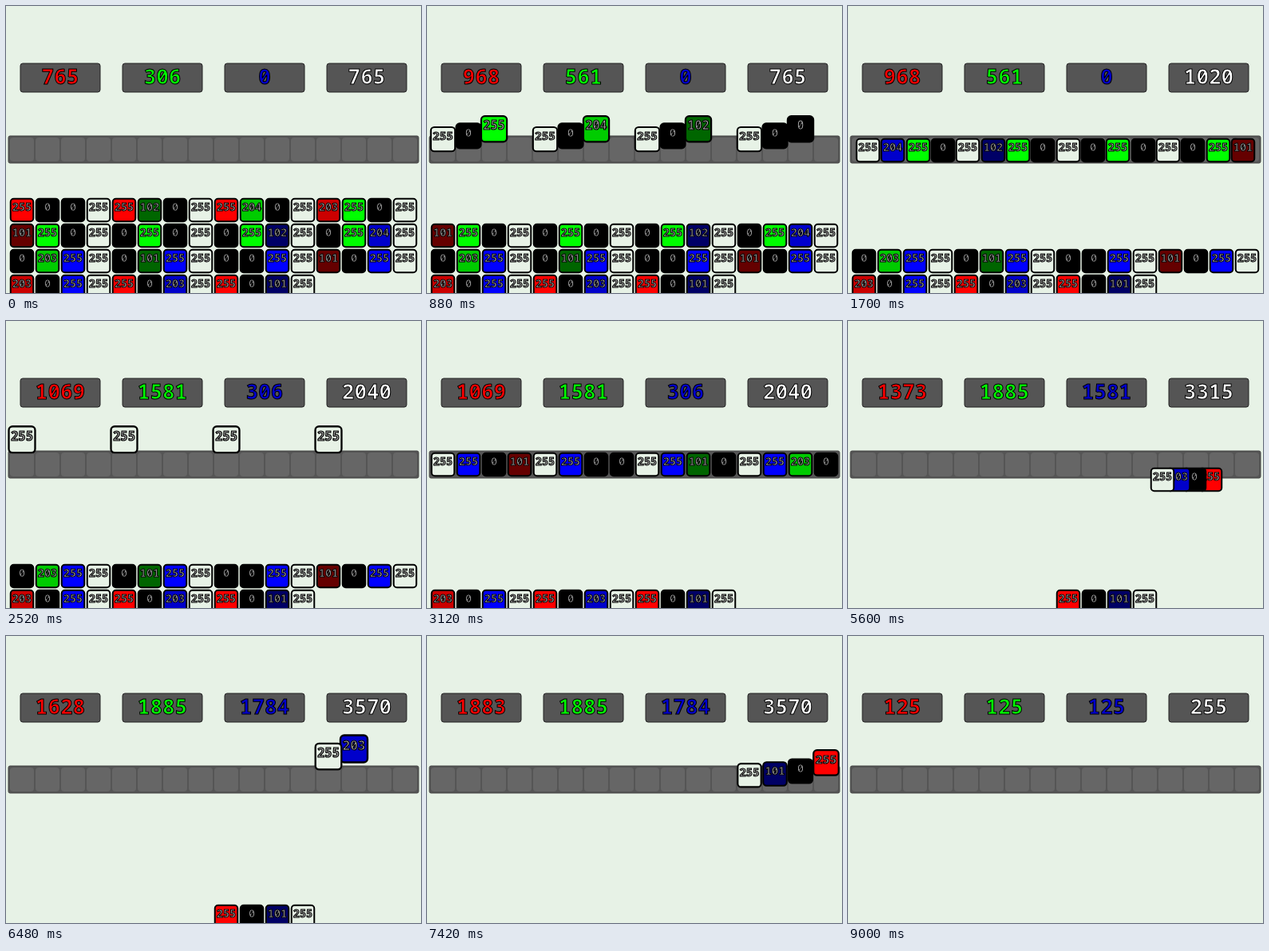
An HTML page with a canvas for the animation above (10 s loop, 520 by 360 pixels).

```html
<!DOCTYPE html>
<html lang="en">
<head>
<meta charset="utf-8">
<title>Average colour, four pixels at a time</title>
<style>
  html, body { margin: 0; width: 100%; height: 100%; overflow: hidden; background: #e7f2e6; }
  canvas { display: block; width: 520px; height: 360px; }
</style>
</head>
<body>
<canvas id="stage" width="520" height="360"></canvas>
<script>
const ctx = document.getElementById('stage').getContext('2d');
const LOOP = 10000, CYCLE = 4000 / 3, HALF = CYCLE / 2, BEAT = 250 / 3;
const PAPER = '#e7f2e6';
const INKS = ['#f00', '#0f0', '#00c', '#fff'];

const pixels = [
  [255, 0, 0], [255, 102, 0], [255, 204, 0], [203, 255, 0],
  [101, 255, 0], [0, 255, 0], [0, 255, 102], [0, 255, 204],
  [0, 203, 255], [0, 101, 255], [0, 0, 255], [101, 0, 255],
  [203, 0, 255], [255, 0, 203], [255, 0, 101]
].map(rgb => [...rgb, 255]);

// Three full rows, then the remaining pixels one by one.
const batches = [[0, 4], [4, 8], [8, 12], [12, 13], [13, 14], [14, 15]];

const clamp = v => Math.min(1, Math.max(0, v));
const outQuad = u => 1 - (1 - u) ** 2;
const inOutExpo = u =>
  u <= 0 ? 0 : u >= 1 ? 1 :
  u < 0.5 ? 2 ** (20 * u - 10) / 2 : 1 - 2 ** (10 - 20 * u) / 2;
const mix = (a, b, p) => a + (b - a) * p;

function box(x, y, w, h, r, fill, stroke, line) {
  ctx.beginPath();
  ctx.roundRect(x, y, w, h, r);
  ctx.fillStyle = fill;
  ctx.fill();
  if (!stroke) return;
  ctx.strokeStyle = stroke;
  ctx.lineWidth = line;
  ctx.stroke();
}

function label(text, x, y, font, fill) {
  ctx.font = `${font} "Noto Sans Mono", "DejaVu Sans Mono", monospace`;
  ctx.textAlign = 'center';
  ctx.lineJoin = 'miter';
  ctx.miterLimit = 3;
  ctx.fillStyle = fill;
  ctx.fillText(text, x, y);
  ctx.lineWidth = 1;
  ctx.strokeStyle = '#000';
  ctx.strokeText(text, x, y);
}

function cell(value, channel, x, y, scale) {
  const rgb = [0, 0, 0];
  if (channel < 3) rgb[channel] = value;
  ctx.save();
  ctx.translate(x, y);
  ctx.scale(scale, scale);
  box(-14.25, -14.25, 28.5, 28.5, 4, channel < 3 ? `rgb(${rgb})` : PAPER, '#000', 2);
  label(value, 0, 1, 'bold 13.5px', '#aaa');
  ctx.restore();
}

function total(channel, t) {
  if (t >= 8750 + channel * BEAT) return channel < 3 ? 125 : 255;
  let count = 3;
  batches.forEach(([, end], k) => {
    if (t >= k * CYCLE + HALF + (channel + 1) * BEAT) count = end;
  });
  return pixels.slice(0, count).reduce((sum, p) => sum + p[channel], 0);
}

function drawBatch([from, to], k, t) {
  const load = t - k * CYCLE, add = load - HALF;
  const move = outQuad(clamp(load / 400));
  const flip = inOutExpo(load / 470);
  const count = (to - from) * 4;
  const startX = 4 + (from % 4) * 128 + count * 16;
  const midX = mix(startX, 516 - count * 16, move);
  const y = mix(256 + 32 * Math.floor(from / 4), 180, move);

  for (let i = 0; i < count; i++) {
    const channel = i % 4;
    const rise = clamp(add / (HALF / 4 * (channel + 1)));
    if (rise >= 1) continue;
    const spread = (i - (count - 1) / 2) * 32;
    const x = Math.round(midX + spread * (1 - 2 * flip));
    cell(pixels[from + (i >> 2)][channel], channel, x, Math.round(y) - 40 * rise, 1 + 0.2 * rise);
  }
}

function draw(t) {
  ctx.fillStyle = PAPER;
  ctx.fillRect(0, 0, 520, 360);

  INKS.forEach((ink, c) => {
    box(18 + c * 128, 72, 100, 36, 3, '#555', '#222', 1);
    label(total(c, t), 68 + c * 128, 98, '600 26px', ink);
  });

  box(3, 163, 514, 34, 2, '#555', '#444', 1);
  for (let i = 0; i < 16; i++) box(5 + i * 32, 165, 30, 30, 4, '#666');

  for (let k = batches.length - 1; k >= 0; k--) drawBatch(batches[k], k, t);
}

const start = performance.now();
function frame() {
  draw((performance.now() - start) % LOOP);
  requestAnimationFrame(frame);
}
frame();
</script>
</body>
</html>
```
